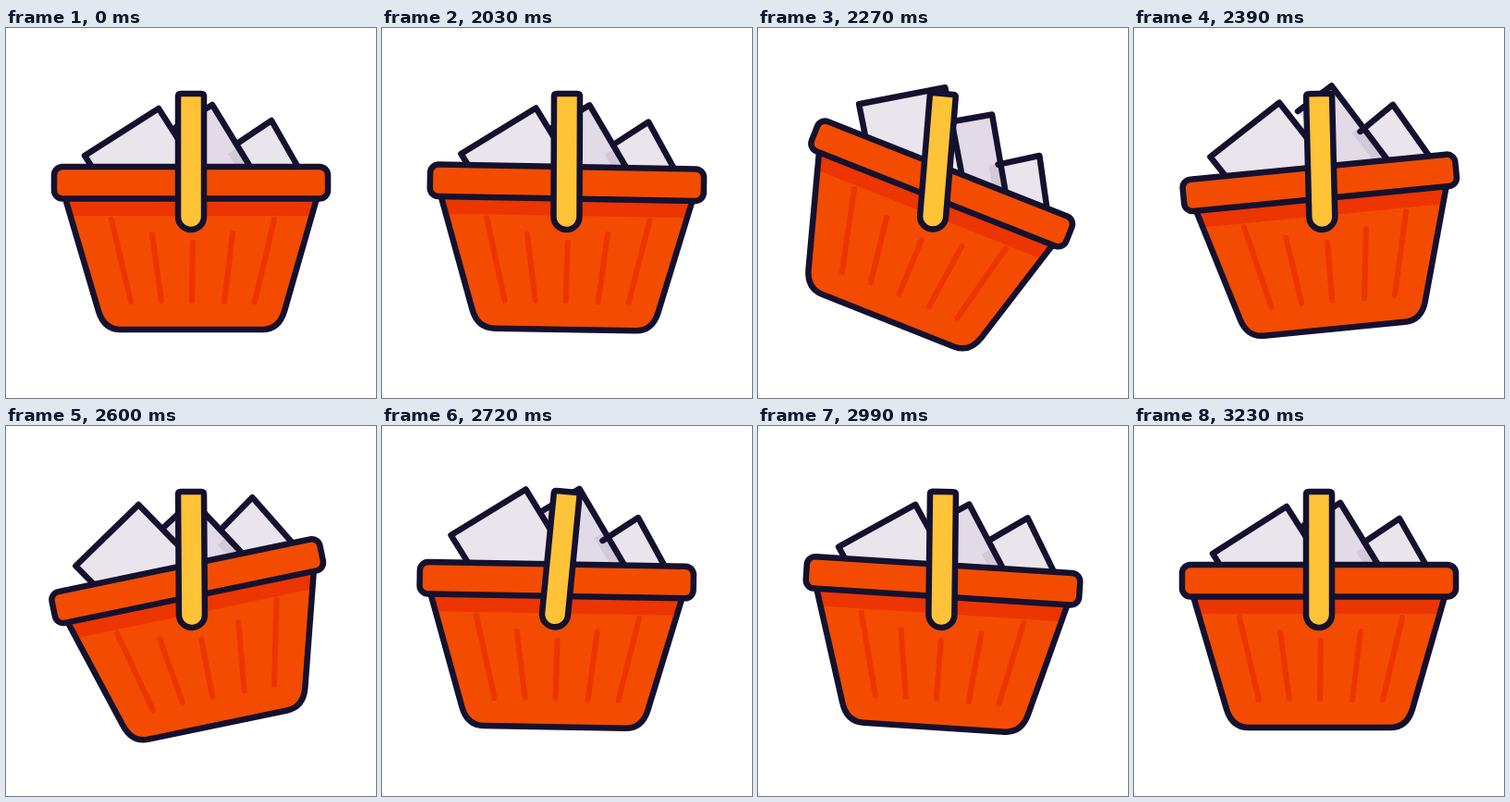
Animation, 400 px wide and 400 px high, one loop 3.29 s. Source, as an HTML page:

```html
<!DOCTYPE html>
<html lang="en">
<head>
<meta charset="utf-8">
<title>Shopping basket</title>
<style>
  html, body { margin: 0; width: 100%; height: 100%; overflow: hidden; background: #fff; }
  svg { display: block; width: 100vw; height: 100vh; }
  .line { stroke: #14112f; stroke-width: 6.5; stroke-linecap: round; stroke-linejoin: round; }
  .none { fill: none; }
  .paper { fill: #eae4ec; }
  .shaded { fill: #e2dae6; }
  .shadow { fill: #d3cad9; }
  .orange { fill: #f34c00; }
  .deep { fill: #ec3500; }
  .ribs { fill: none; stroke: #ec3500; stroke-width: 6; stroke-linecap: round; }
  .yellow { fill: #ffc338; }
</style>
</head>
<body>
<svg viewBox="0 0 400 400">
  <g id="swing">
    <g id="basket">
      <path class="right paper" d="M245 127 287 100 336 186H270Z"/>
      <g class="middle">
        <path class="shaded" d="M184 107 223 83 286 186H228Z"/>
        <path class="shadow" d="M240 136 250 130 286 186H271Z"/>
        <path class="line none" d="M184 107 223 83 286 186"/>
      </g>
      <path class="right line none" d="M249 125.500 287 100 336 186"/>
      <path class="left line paper" d="M116 186 85 138 165 87 228 186"/>
      <path class="orange" d="M64 184 100 306Q106 326 124 326H277Q295 326 301 306L336 184Z"/>
      <path class="deep" d="M64 184H336L330.500 203H69.800Z"/>
      <path class="ribs" d="M114 207 135 296M158 223 168 295M202 232 201 295M245 222 236 296M290 207 269 296"/>
      <path class="line none" d="M64 184 100 306Q106 326 124 326H277Q295 326 301 306L336 184"/>
      <rect class="line orange" x="52" y="150" width="296" height="34.500" rx="9"/>
    </g>
    <path class="line yellow" d="M189 71H211Q214 71 214 74V204A14 14 0 0 1 186 204V74Q186 71 189 71Z"/>
  </g>
</svg>
<script>
const LOOP = 3290, START = 2000, BEAT = 245;
const HOP = { first: 107, delay: 95, length: 385, height: 19 };

// Angles at each beat: the handle, and the basket relative to it.
const swing = [0, 5, -5, 5.7, 0.7, 0];
const tilt = [0, 18, -16.5, -4.5, 3, 0];

const smooth = u => u * u * (3 - 2 * u);

function angle(poses, t) {
  const beat = Math.max(0, t / BEAT), i = Math.floor(beat);
  const from = poses[i] ?? 0, to = poses[i + 1] ?? 0;
  return from + (to - from) * smooth(beat - i);
}

// Two hops per sheet, each sheet a little later than the one before.
function rise(sheet, t) {
  const hops = (t - HOP.first - sheet * HOP.delay) / HOP.length;
  return hops > 0 && hops < 2 ? HOP.height * Math.sin(Math.PI * hops) ** 2 : 0;
}

const move = (selector, value) => document.querySelectorAll(selector)
  .forEach(el => el.setAttribute('transform', value));

function draw() {
  const t = performance.now() % LOOP - START;
  move('#swing', `rotate(${angle(swing, t)} 200 71)`);
  move('#basket', `rotate(${angle(tilt, t)} 200 190)`);
  ['.left', '.middle', '.right'].forEach((name, i) => move(name, `translate(0 ${-rise(i, t)})`));
  requestAnimationFrame(draw);
}
draw();
</script>
</body>
</html>
```
